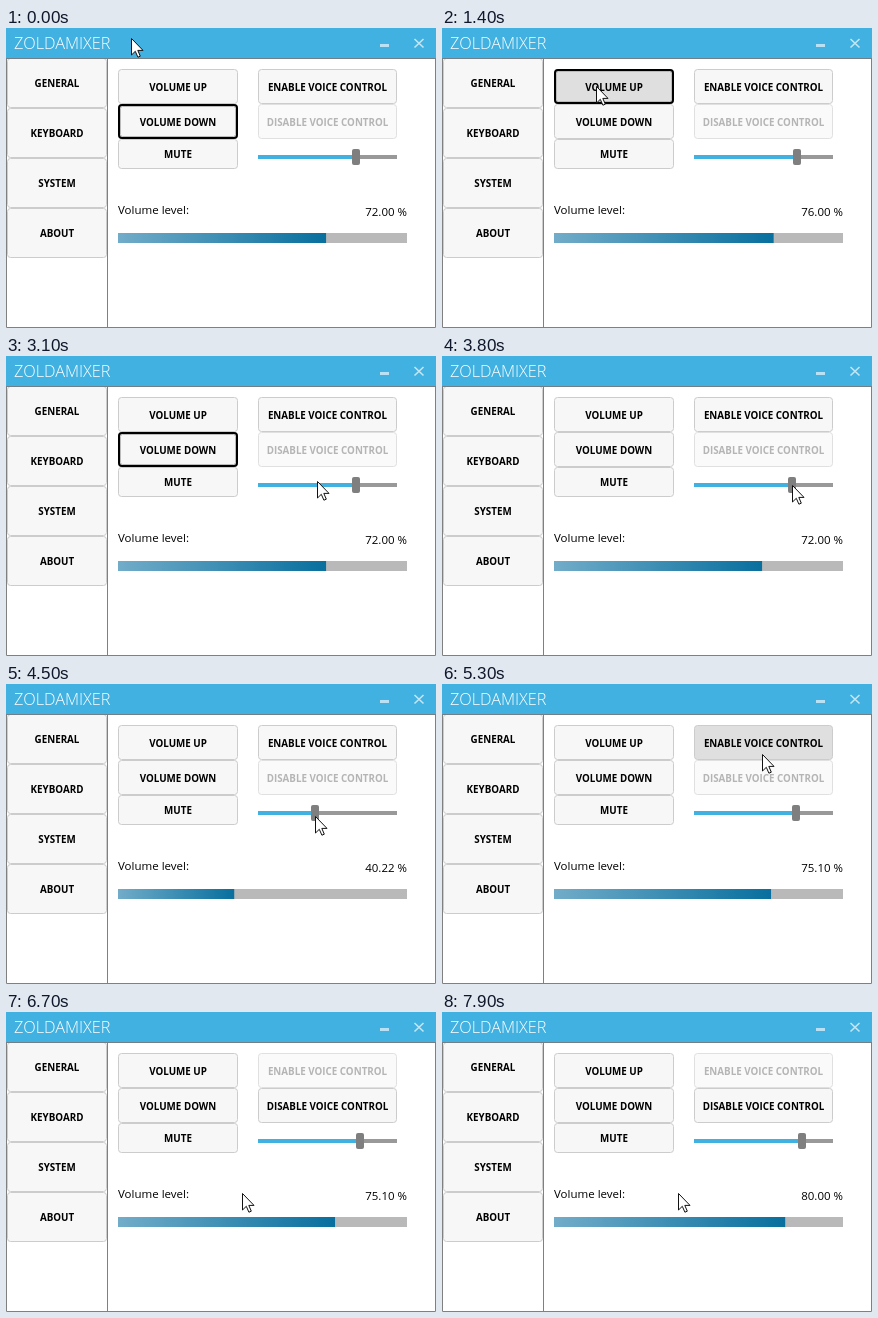
These frames come from a looping animation (430 px wide and 300 px high, 8000 ms). An HTML page:

```html
<!DOCTYPE html>
<html lang="en">
<head>
<meta charset="utf-8">
<title>Volume control</title>
<style>
  html, body { margin: 0; width: 100%; height: 100%; overflow: hidden; background: #fff; }
  svg { display: block; width: 430px; height: 300px; font-family: "Open Sans", "Noto Sans", sans-serif; }
  .title { font-size: 16.3px; font-weight: 300; fill: #fff; }
  .label { font-size: 11.5px; fill: #000; }
  .button rect { fill: #f7f7f7; stroke: #ccc; }
  .button text { font-size: 9.8px; font-weight: 700; text-anchor: middle; fill: #000; }
  .button .ring { display: none; fill: none; }
  .button .outer { stroke: #000; stroke-width: 2; }
  .button .inner { stroke: #bbb; }
  .hover .face { fill: #dfdfdf; }
  .focus .ring { display: inline; }
  .disabled .face { fill: #fafafa; stroke: #e0e0e0; }
  .disabled text { fill: #b5b5b5; }
</style>
</head>
<body>
<svg viewBox="0 0 430 300">
  <defs>
    <linearGradient id="level">
      <stop offset="0" stop-color="#72acc9"/>
      <stop offset="1" stop-color="#086f9e"/>
    </linearGradient>
  </defs>
  <path d="M.5 30V299.5H429.5V30M101.5 30V300" fill="none" stroke="#808080"/>
  <g id="buttons"></g>
  <rect width="430" height="30" fill="#41b1e1"/>
  <path d="M0 30.5H430" stroke="#727f86"/>
  <text class="title" x="8" y="21">ZOLDAMIXER</text>
  <path d="M374 17.5H383" stroke="#b9e1f3" stroke-width="3"/>
  <path d="M408.5 11L417.5 19.5M417.5 11L408.5 19.5" stroke="#c4e6f5" stroke-width="1.6"/>
  <rect x="252" y="127" width="139" height="4" fill="#999"/>
  <rect id="track" x="252" y="127" height="4" fill="#41b1e1"/>
  <rect id="thumb" y="121" width="8" height="16" rx="2" fill="#7f7f7f"/>
  <text class="label" x="112" y="186">Volume level:</text>
  <text class="label" id="percent" x="401" y="188" text-anchor="end"></text>
  <rect x="112" y="205" width="289" height="10" fill="#b9b9b9"/>
  <rect id="bar" x="112" y="205" height="10" fill="url(#level)"/>
  <path id="cursor" d="M.5 .5V17L4.3 13.3L6.9 19.2L9.3 18.2L6.8 12.4H12Z" fill="#fff" stroke="#111"/>
</svg>
<script>
const LOOP = 8000, STEP = 100, TRAVEL = 400;
const UP = 1100, DOWN = 2200, GRAB = 3700, RELEASE = 4900, VOICE_ON = 5700, VOICE_UP = 7200;
const byId = id => document.getElementById(id);

const SLIDER_X = 256.3, SLIDER_W = 130;
const thumbX = volume => SLIDER_X + volume / 100 * SLIDER_W;
const volumeFrom = x => (x - SLIDER_X) / SLIDER_W * 100;

// Each move ends at its arrival time and takes TRAVEL ms.
const moves = [
  { arrive: 800, x: 154, y: 58 },
  { arrive: 2000, x: 160, y: 91 },
  { arrive: 3000, x: 311, y: 125 },
  { arrive: 3600, x: thumbX(72), y: 129 },
  { arrive: 4400, x: thumbX(40.22), y: 132 },
  { arrive: RELEASE, x: thumbX(75.1), y: 130 },
  { arrive: 5300, x: 320, y: 70 },
  { arrive: 6500, x: 236, y: 181 }
];

const clamp = (v, lo, hi) => Math.min(hi, Math.max(lo, v));
const ease = u => u * u * (3 - 2 * u);

function cursorAt(t) {
  return moves.reduce((from, to) => {
    const u = ease(clamp((t - to.arrive) / TRAVEL + 1, 0, 1));
    return { x: from.x + (to.x - from.x) * u, y: from.y + (to.y - from.y) * u };
  }, { x: 125, y: 10 });
}

// Number of presses made so far in a run that begins at a given time.
const presses = (t, begin, count) => clamp(Math.floor((t - begin) / 200) + 1, 0, count);

function volumeAt(t, cursor) {
  if (t < GRAB) return 72 + 2 * (presses(t, UP, 2) - presses(t, DOWN, 2));
  if (t < RELEASE) return volumeFrom(cursor.x);
  return t < VOICE_UP ? 75.1 : 74 + 2 * presses(t, VOICE_UP, 3);
}

function focusAt(t) {
  if (t >= GRAB) return "";
  return t >= UP && t < DOWN ? "VOLUME UP" : "VOLUME DOWN";
}

const buttons = [];
function addButton(label, x, y, w, h) {
  const box = (name, inset, rx) => `<rect class="${name}" x="${x + inset}" y="${y + inset}"
    width="${w - 2 * inset}" height="${h - 2 * inset}" rx="${rx}"/>`;
  const g = document.createElementNS("http://www.w3.org/2000/svg", "g");
  g.innerHTML = box("face", .5, 3) + box("ring inner", 2.5, 2) + box("ring outer", 1, 3) +
    `<text x="${x + w / 2}" y="${y + h / 2 + 4}">${label}</text>`;
  byId("buttons").append(g);
  buttons.push({ g, label, x, y, w, h });
}
["GENERAL", "KEYBOARD", "SYSTEM", "ABOUT"].forEach((label, i) => addButton(label, 1, 30 + 50 * i, 100, 50));
["VOLUME UP", "VOLUME DOWN"].forEach((label, i) => addButton(label, 112, 41 + 35 * i, 120, 35));
addButton("MUTE", 112, 111, 120, 30);
["ENABLE", "DISABLE"].forEach((verb, i) => addButton(verb + " VOICE CONTROL", 252, 41 + 35 * i, 139, 35));

function draw(t) {
  const cursor = cursorAt(t);
  const volume = volumeAt(t, cursor);
  const thumb = thumbX(volume);
  const focused = focusAt(t);
  const disabled = (t < VOICE_ON ? "DISABLE" : "ENABLE") + " VOICE CONTROL";
  const x = Math.round(cursor.x), y = Math.round(cursor.y);

  for (const b of buttons) {
    const over = x >= b.x && x < b.x + b.w && y >= b.y && y < b.y + b.h;
    const state = b.label === disabled ? "disabled" : over ? "hover" : "";
    b.g.setAttribute("class", `button ${state} ${b.label === focused ? "focus" : ""}`);
  }
  byId("cursor").setAttribute("transform", `translate(${x} ${y})`);
  byId("track").setAttribute("width", thumb - 252);
  byId("thumb").setAttribute("x", Math.round(thumb - 4));
  byId("bar").setAttribute("width", volume * 2.89);
  byId("percent").textContent = volume.toFixed(2) + " %";
}

const start = performance.now();
function frame() {
  const t = (performance.now() - start) % LOOP;
  draw(Math.floor(t / STEP) * STEP);
  requestAnimationFrame(frame);
}
frame();
</script>
</body>
</html>
```
